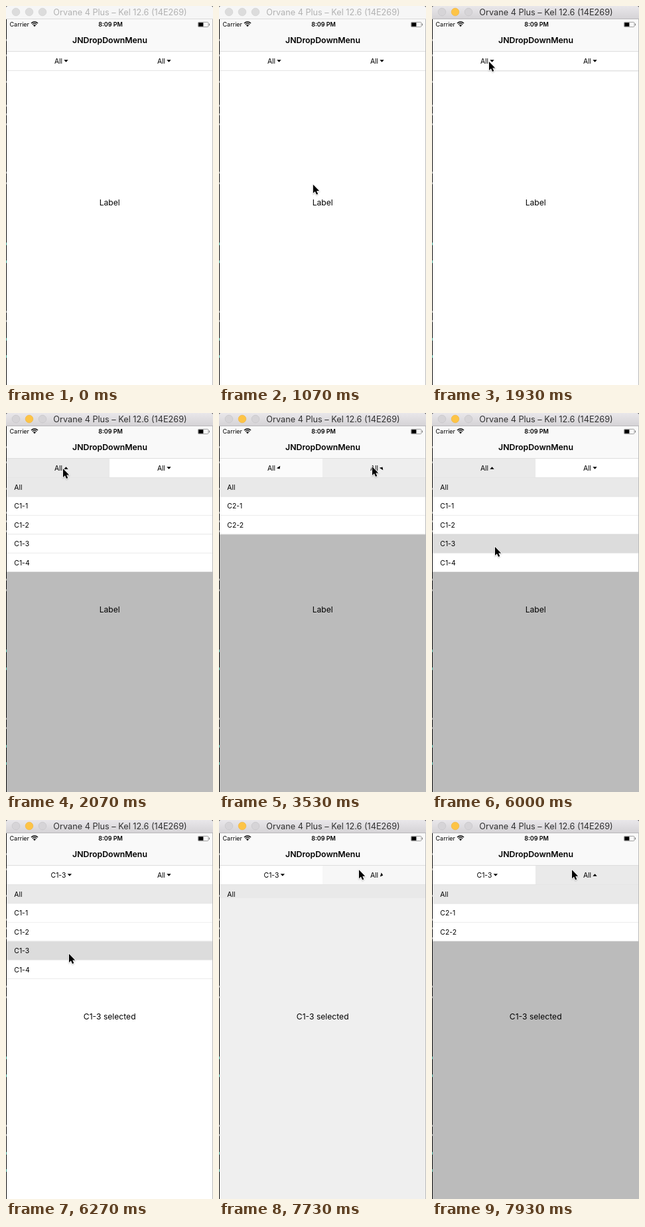
Recreate the animation shown at these times as an HTML page with a canvas. Size 312 px wide and 572 px high, loop 8 s.

```html
<!DOCTYPE html>
<html lang="en">
<head>
<meta charset="utf-8">
<title>JNDropDownMenu</title>
<style>
html, body { margin: 0; width: 100%; height: 100%; overflow: hidden; background: #fff; }
canvas { display: block; width: 312px; height: 572px; }
</style>
</head>
<body>
<canvas id="stage"></canvas>
<script>
const W = 312, H = 572, LOOP = 8000;
const ROW = 28.4, MENU_TOP = 98, SPLIT = 156;
const MENUS = [
  ['All', 'C1-1', 'C1-2', 'C1-3', 'C1-4'],
  ['All', 'C2-1', 'C2-2'],
];
const OPEN = 1925, TO_RIGHT = 3450, TO_LEFT = 4815, PRESS = 6000, PICK = 6120, REOPEN = 7684;

const canvas = document.getElementById('stage');
const ctx = canvas.getContext('2d');
const dpr = window.devicePixelRatio || 1;
canvas.width = W * dpr;
canvas.height = H * dpr;

const smooth = u => u * u * (3 - 2 * u);

// cubic-bezier(.4, 0, .2, 1)
function snappy(u) {
  let lo = 0, hi = 1, s = 0.5;
  for (let i = 0; i < 14; i++) {
    s = (lo + hi) / 2;
    const x = 1.2 * (1 - s) * (1 - s) * s + 0.6 * (1 - s) * s * s + s * s * s;
    if (x < u) lo = s; else hi = s;
  }
  return smooth(s);
}

// Each key is [start, duration, value]
function track(t, from, keys, ease) {
  let v = from;
  for (const [start, dur, to] of keys) {
    if (t <= start) break;
    v += (to - v) * ease(Math.min(1, (t - start) / dur));
  }
  return v;
}

const menuHeight = t => track(t, 0, [
  [OPEN, 150, 5 * ROW], [TO_RIGHT, 150, 3 * ROW], [TO_LEFT, 150, 5 * ROW],
  [6280, 170, 0], [REOPEN, 150, 3 * ROW],
], smooth);
const dim = t => track(t, 0, [[OPEN, 150, 0.267], [PICK, 130, 0], [REOPEN, 150, 0.267]], smooth);
const leftTab = t => track(t, 0, [[OPEN, 150, 1], [TO_RIGHT, 150, 0], [TO_LEFT, 150, 1], [PICK, 150, 0]], snappy);
const rightTab = t => track(t, 0, [[TO_RIGHT, 150, 1], [TO_LEFT, 150, 0], [REOPEN, 150, 1]], snappy);
const cursorX = t => track(t, -14, [
  [30, 560, 148], [960, 570, 86], [2430, 770, 231], [3960, 640, 67.5], [5220, 580, 95], [6630, 840, 211],
], smooth);
const cursorY = t => track(t, 492, [
  [30, 560, 290], [960, 570, 84], [2430, 770, 81], [3960, 640, 84], [5220, 580, 202], [6630, 840, 75.3],
], smooth);

function rect(x, y, w, h, color) {
  ctx.fillStyle = color;
  ctx.fillRect(x, y, w, h);
}

function text(str, x, y, size, { weight = 400, color = '#000', align = 'center' } = {}) {
  ctx.font = `${weight} ${size}px Inter, Roboto, sans-serif`;
  ctx.textAlign = align;
  ctx.fillStyle = color;
  ctx.fillText(str, x, y);
}

function dot(x, fill, line) {
  ctx.beginPath();
  ctx.arc(x, 9, 5.8, 0, 7);
  ctx.fillStyle = fill;
  ctx.fill();
  ctx.strokeStyle = line;
  ctx.lineWidth = 0.7;
  ctx.stroke();
}

function titleBar(active) {
  rect(0, 0, W, 20, '#444');
  const g = ctx.createLinearGradient(0, 0, 0, 20);
  g.addColorStop(0, active ? '#e9e7ea' : '#f6f6f6');
  g.addColorStop(1, active ? '#d4d2d5' : '#f6f6f6');
  ctx.fillStyle = g;
  ctx.beginPath();
  ctx.roundRect(0, 0, W, 20, [3, 3, 0, 0]);
  ctx.fill();
  rect(0, 19, W, 1, active ? '#bab8bb' : '#dadada');
  const off = active ? ['#d6d4d7', '#c6c4c7'] : ['#dcdcdc', '#d2d2d2'];
  const on = active ? ['#fdc446', '#f0b545'] : off;
  dot(15, ...off);
  dot(35, ...on);
  dot(55, ...off);
  text('Orvane 4 Plus – Kel 12.6 (14E269)', 172, 14, 12.7, { color: active ? '#303030' : '#b2b2b2' });
}

function statusBar() {
  text('Carrier', 5.5, 31, 9, { align: 'left' });
  text('8:09 PM', 157.5, 31, 9, { weight: 600 });

  ctx.strokeStyle = '#000';
  ctx.lineWidth = 1.3;
  for (const r of [7.2, 4.7]) {
    ctx.beginPath();
    ctx.arc(43, 31.2, r, -Math.PI * 0.75, -Math.PI * 0.25);
    ctx.stroke();
  }
  ctx.beginPath();
  ctx.moveTo(43, 31.2);
  ctx.arc(43, 31.2, 2.8, -Math.PI * 0.75, -Math.PI * 0.25);
  ctx.fillStyle = '#000';
  ctx.fill();

  ctx.strokeStyle = '#777';
  ctx.lineWidth = 0.7;
  ctx.beginPath();
  ctx.roundRect(289.4, 24.4, 15.6, 7.2, 1.5);
  ctx.stroke();
  rect(290.2, 25.2, 7.2, 5.6, '#000');
  rect(306, 26.6, 1, 2.8, '#777');
}

function tab(label, x, w, mid, p) {
  const c = Math.round(255 - 21 * p);
  rect(x, 69, w, 28, `rgb(${c},${c},${c})`);
  text(label, mid, 87, 10.4);
  ctx.save();
  ctx.translate(mid + ctx.measureText(label).width / 2 + 5.4, 83);
  ctx.rotate(-Math.PI * p);
  ctx.beginPath();
  ctx.moveTo(-3.2, -1.8);
  ctx.lineTo(3.2, -1.8);
  ctx.lineTo(0, 1.8);
  ctx.fillStyle = '#000';
  ctx.fill();
  ctx.restore();
}

function menu(rows, h, pressed) {
  if (h <= 0) return;
  ctx.save();
  ctx.beginPath();
  ctx.rect(1, MENU_TOP, W - 2, h);
  ctx.clip();
  rows.forEach((row, i) => {
    const y = MENU_TOP + i * ROW;
    rect(1, y, W - 2, ROW, i === pressed ? '#dcdcdc' : i === 0 ? '#e9e9e9' : '#fff');
    rect(1, y + ROW - 0.7, W - 2, 0.7, '#e2e2e2');
    text(row, 12.3, y + 18, 10.4, { align: 'left' });
  });
  ctx.restore();
}

function edges() {
  rect(0, 20, 1, H - 20, '#0c0c0c');
  rect(W - 1, 20, 1, H - 20, '#bbb');
  for (const y of [50, 73, 113, 149, 162, 177, 250, 266, 460, 474]) rect(0, y, 1, 3, '#888');
  for (const y of [357, 384, 501, 527]) rect(0, y, 1, 4, '#3fa796');
}

function cursor(x, y) {
  ctx.save();
  ctx.translate(x, y);
  ctx.scale(0.92, 0.92);
  ctx.beginPath();
  [[0, 0], [0, 14], [3.2, 11.1], [5.5, 16.3], [7.9, 15.3], [5.7, 10.2], [10, 10.2]]
    .forEach(([px, py]) => ctx.lineTo(px, py));
  ctx.closePath();
  ctx.shadowColor = 'rgba(0,0,0,.25)';
  ctx.shadowBlur = 2 * dpr;
  ctx.shadowOffsetY = dpr;
  ctx.strokeStyle = '#fff';
  ctx.lineWidth = 1.6;
  ctx.stroke();
  ctx.shadowColor = 'transparent';
  ctx.fillStyle = '#000';
  ctx.fill();
  ctx.restore();
}

function draw(t) {
  ctx.setTransform(dpr, 0, 0, dpr, 0, 0);
  rect(0, 0, W, H, '#fff');

  const picked = t >= PICK;
  text(picked ? 'C1-3 selected' : 'Label', 156.2, 300.7, 12.1);
  rect(1, MENU_TOP, W - 2, H - MENU_TOP, `rgba(0,0,0,${dim(t)})`);

  const right = (t >= TO_RIGHT && t < TO_LEFT) || t >= REOPEN;
  menu(MENUS[right ? 1 : 0], menuHeight(t), t >= PRESS && !right ? 3 : -1);

  rect(0, 20, W, 48, '#f9f9f9');
  rect(0, 68, W, 1, '#dedede');
  tab(picked ? 'C1-3' : 'All', 1, SPLIT - 1, 79, leftTab(t));
  tab('All', SPLIT, W - SPLIT - 1, 234, rightTab(t));
  rect(0, 97, W, 1, '#e5e5e5');
  text('JNDropDownMenu', 156.5, 56, 12.3, { weight: 600 });

  statusBar();
  edges();
  titleBar(t >= 1870);
  cursor(cursorX(t), cursorY(t));
}

const began = performance.now();
function frame() {
  draw((performance.now() - began) % LOOP);
  requestAnimationFrame(frame);
}
frame();
</script>
</body>
</html>
```
